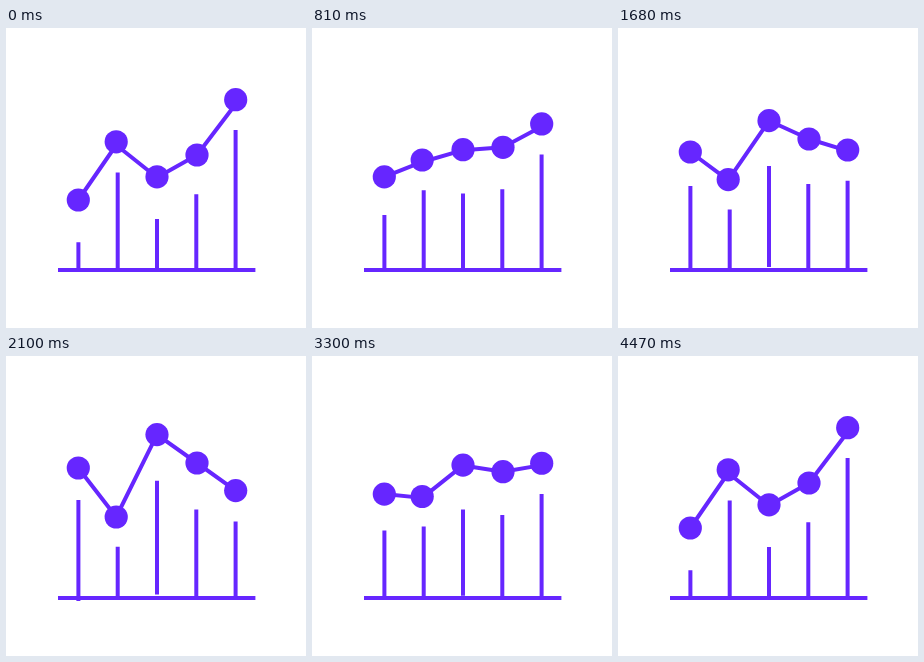
Animation, 300 px wide and 300 px high, one loop 4.5 s. Source, as an HTML page:

```html
<!DOCTYPE html>
<html lang="en">
<head>
<meta charset="utf-8">
<title>Chart</title>
<style>
  html, body { margin: 0; width: 100%; height: 100%; overflow: hidden; background: #fff; }
  svg { display: block; width: 100vw; height: 100vh; }
  path { fill: none; stroke: #6626ff; stroke-width: 4; }
  circle { fill: #6626ff; }
</style>
</head>
<body>
<svg viewBox="0 0 300 300">
  <path d="M52 242H249.4"/>
  <path id="bars"/>
  <path id="trend" stroke-linejoin="round"/>
  <g id="dots"></g>
</svg>
<script>
const LOOP = 4500, STEP = 30;
const RISE_END = 2100, FALL_START = 2400, FALL_END = 4470;

// Each [a, b] pair runs from the first pose to the second.
const points = [
  { x: 72.3,  dot: [172, 112],    joint: [172, 112],    barX: 72.4,  top: [214.2, 144],   foot: [240.4, 245] },
  { x: 110.2, dot: [113.8, 161],  joint: [117, 161],    barX: 111.7, top: [144.5, 190.7], foot: [242, 242] },
  { x: 151,   dot: [148.8, 78.6], joint: [149.5, 78.6], barX: 151,   top: [191, 124.8],   foot: [241, 238.6] },
  { x: 191,   dot: [127, 107],    joint: [127, 107],    barX: 190.3, top: [166.2, 153.4], foot: [242, 242] },
  { x: 229.7, dot: [71.7, 134.6], joint: [76, 134.6],   barX: 229.6, top: [102, 165.5],   foot: [242, 242] }
];

const bars = document.getElementById("bars");
const trend = document.getElementById("trend");
const dots = points.map(p => {
  const c = document.createElementNS("http://www.w3.org/2000/svg", "circle");
  c.setAttribute("cx", p.x);
  c.setAttribute("r", 11.6);
  return document.getElementById("dots").appendChild(c);
});

function progress(t) {
  if (t < RISE_END) return t / RISE_END;
  if (t < FALL_START) return 1;
  return Math.max(0, 1 - (t - FALL_START) / (FALL_END - FALL_START));
}

function draw(time) {
  const t = Math.floor((time % LOOP) / STEP) * STEP;
  const k = progress(t);
  const mix = ([a, b]) => (a + (b - a) * k).toFixed(2);
  bars.setAttribute("d", points.map(p => `M${p.barX} ${mix(p.top)}V${mix(p.foot)}`).join(""));
  trend.setAttribute("d", "M" + points.map(p => `${p.x} ${mix(p.joint)}`).join("L"));
  dots.forEach((c, i) => c.setAttribute("cy", mix(points[i].dot)));
}

const start = performance.now();
function tick() {
  draw(performance.now() - start);
  requestAnimationFrame(tick);
}
tick();
</script>
</body>
</html>
```
